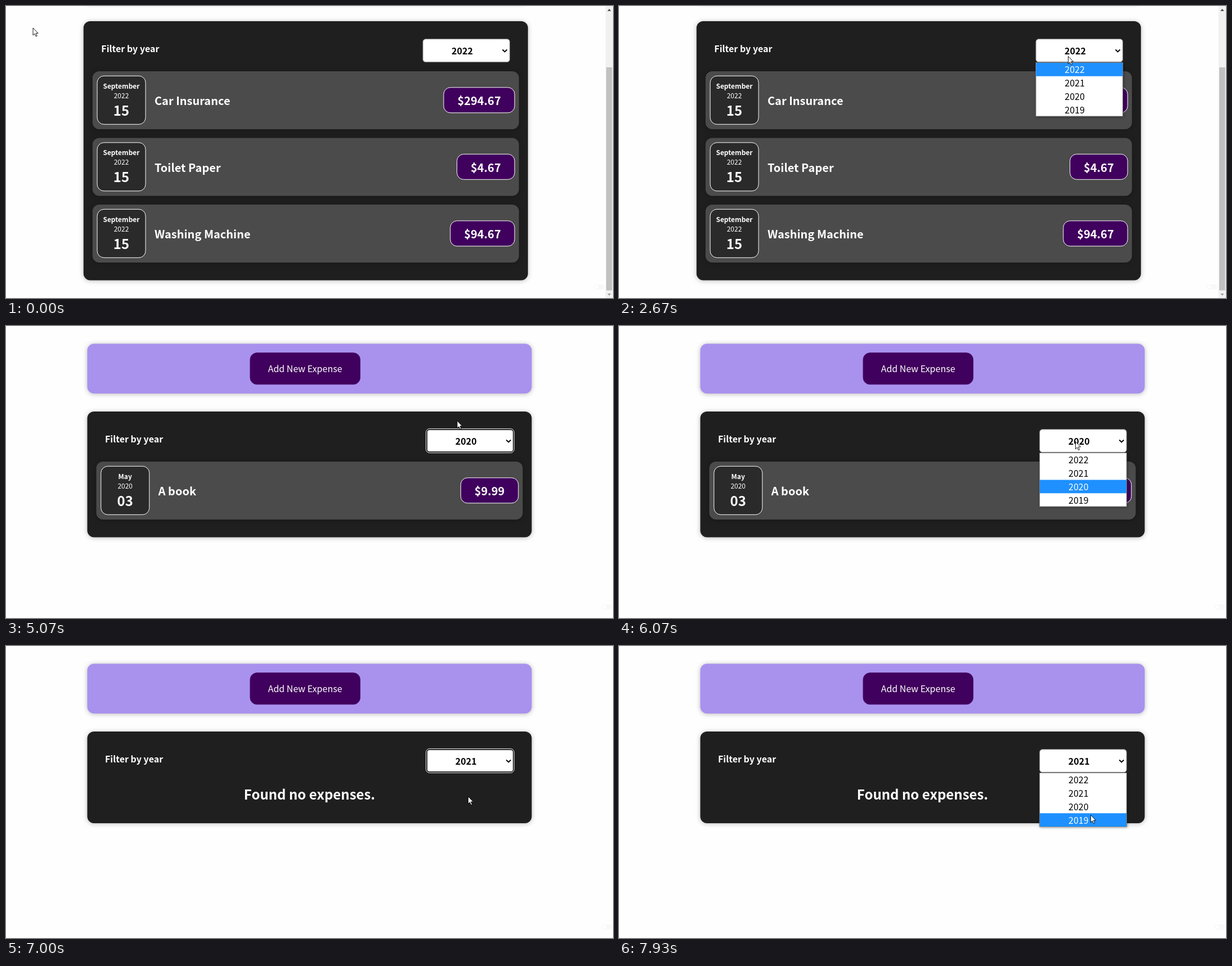
Animation, 1079 px wide and 519 px high, one loop 8000 ms. Source, as an HTML page:

```html
<!DOCTYPE html>
<html lang="en">
<head>
<meta charset="utf-8">
<title>Expenses by year</title>
<style>
html, body { margin: 0; width: 100%; height: 100%; overflow: hidden; background: #fefefe; }
svg { display: block; width: 1079px; height: 519px; }
text { font: 700 16px "Noto Sans CJK JP", "Noto Sans", sans-serif; fill: #fff; }
.card { filter: drop-shadow(0 1px 4px #0004); }
</style>
</head>
<body>
<svg id="stage" viewBox="0 0 1079 519"></svg>
<script>
const TICK = 1000 / 15, TICKS = 120;
const YEARS = [2022, 2021, 2020, 2019];
const ROW_TOP = 226, ROW = 23.75;
const SCROLL = { x: -6.7, y: -125 };
const EXPENSES = {
  2022: [['September', '15', 'Car Insurance', 294.67],
         ['September', '15', 'Toilet Paper', 4.67],
         ['September', '15', 'Washing Machine', 94.67]],
  2021: [],
  2020: [['May', '03', 'A book', 9.99]]
};

// Pointer moves: first tick, last tick, from, to, sideways bend in y
const MOVES = [
  [3, 16, [47.5, 38.5], [782, 111], 42],
  [16, 18, [782, 111], [787, 111], 0],
  [33, 38, [787, 111], [798, 89], 0],
  [47, 55, [798, 89], [801.5, 168], 0],
  [84, 89, [801.5, 168], [811, 205], 0],
  [93, 100, [811, 205], [821, 267], 0],
  [105, 111, [821, 267], [820, 208], 0],
  [114, 119, [820, 208], [838, 300], 0]
];

const rect = (x, y, w, h, r, fill, more = '') =>
  `<rect x="${x}" y="${y}" width="${w}" height="${h}" rx="${r}" fill="${fill}" ${more}/>`;
const text = (x, y, str, size = 16, anchor = 'start', css = '') =>
  `<text x="${x}" y="${y}" text-anchor="${anchor}" style="font-size:${size}px;${css}">${str}</text>`;
const card = 'class="card"', white = 'stroke="#fff"';

function pointer(n) {
  const move = MOVES.filter(m => n >= m[0]).pop() || MOVES[0];
  const [start, end, from, to, bend] = move;
  const p = Math.min(1, Math.max(0, (n - start) / (end - start)));
  const e = p * p * (3 - 2 * p);
  return [from[0] + (to[0] - from[0]) * e,
          from[1] + (to[1] - from[1]) * e + bend * Math.sin(Math.PI * e)];
}

function item([month, day, title, amount], year, i) {
  const w = 102.5 + 11.8 * (String(amount).length - 4);
  return `<g transform="translate(0 ${i * 118.5})">` +
    rect(160.5, 241, 758, 103, 12, '#4b4b4b', card) +
    rect(168.8, 249.3, 86, 86, 12, '#2a2a2a', white) +
    text(211.7, 271.7, month, 12, 'middle') +
    text(211.7, 288.6, year, 12, 'middle', 'font-weight:400') +
    text(211.7, 319.5, day, 24, 'middle') +
    text(270.7, 301, title, 20) +
    rect(910.8 - w, 269.8, w, 45, 12, '#40005d', white) +
    text(910.8 - w / 2, 301, '$' + amount, 20, 'middle') + '</g>';
}

function select(year, focused) {
  return (focused
      ? rect(746.7, 182.7, 156.4, 42.6, 6, '#101010', white) +
        rect(749, 185, 152, 38, 3.5, '#fff')
      : rect(747.7, 183.7, 154.6, 41, 5, '#fff', 'stroke="#767676"')) +
    text(817.7, 211, year, 16, 'middle', 'fill:#000') +
    '<path d="M889.3 202.5l4 4 4-4" fill="none" stroke="#000" stroke-width="1.9"/>';
}

function menu(active) {
  return rect(747.7, 225.5, 154.6, 95.5, 0, '#fff',
      'stroke="#767676" style="filter:drop-shadow(1px 1px 2px #0006)"') +
    YEARS.map((year, i) => {
      const on = i === active, y = ROW_TOP + i * ROW;
      return (on ? rect(748, y, 154, ROW, 0, '#1e90ff') : '') +
        text(816.8, y + 18.3, year, 16, 'middle', `font-weight:400;fill:${on ? '#fff' : '#000'}`);
    }).join('');
}

function scrollbar() {
  return rect(1065.5, 0, 14, 519, 0, '#f1f1f1') +
    rect(1067, 109, 10.5, 396.5, 0, '#c1c1c1') +
    '<path d="M1069 9l3.3-4 3.3 4z" fill="#505050"/>' +
    '<path d="M1069 511l3.3 4 3.3-4z" fill="#a3a3a3"/>';
}

function toggle(x) {
  return rect(x, 495, 18, 9, 4.5, '#f8f8f8') +
    `<circle cx="${x + 4.5}" cy="499.5" r="4" fill="#fff" stroke="#f6f6f6"/>`;
}

function draw(n) {
  const year = n < 76 ? 2022 : n < 104 ? 2020 : 2021;
  const scrolled = year === 2022;
  const open = n >= 40 && n < 76 || n >= 91 && n < 104 || n >= 113;
  const list = EXPENSES[year];
  const height = list.length ? 105 + 118.5 * list.length : 163;
  const [x, y] = pointer(n);

  const row = Math.floor((y - (scrolled ? SCROLL.y : 0) - ROW_TOP) / ROW);
  const active = row >= 0 && row < 4 ? row : YEARS.indexOf(year);
  const shift = scrolled ? `translate(${SCROLL.x} ${SCROLL.y})` : '';

  document.getElementById('stage').innerHTML =
    `<g transform="${shift}">` +
    rect(144.5, 31.5, 790, 88.5, 12, '#a892ee', card) +
    rect(434, 47.7, 195.5, 56, 12, '#40005d', 'stroke="#4b0a6b"') +
    text(531.6, 82, 'Add New Expense', 16, 'middle', 'font-weight:400') +
    rect(144.5, 152, 790, height, 12, '#1f1f1f', card) +
    text(176, 207, 'Filter by year') +
    select(year, !scrolled && !open) +
    (list.length
      ? list.map((e, i) => item(e, year, i)).join('')
      : text(539.5, 272.6, 'Found no expenses.', 24, 'middle')) +
    (open ? menu(active) : '') + '</g>' +
    (scrolled ? scrollbar() : '') +
    toggle(scrolled ? 1045 : 1059) +
    `<path transform="translate(${x} ${y})" d="M.5.5V13.6L3.4 10.8 5.6 15.6 7.7 14.7 5.5 9.9H9.6Z"
      fill="#fff" stroke="#000" stroke-width=".9"/>`;
}

const begin = performance.now();
let last = -1;
function loop() {
  const n = Math.floor((performance.now() - begin + 3.4) / TICK) % TICKS;
  if (n !== last) draw(last = n);
  requestAnimationFrame(loop);
}
loop();
</script>
</body>
</html>
```
